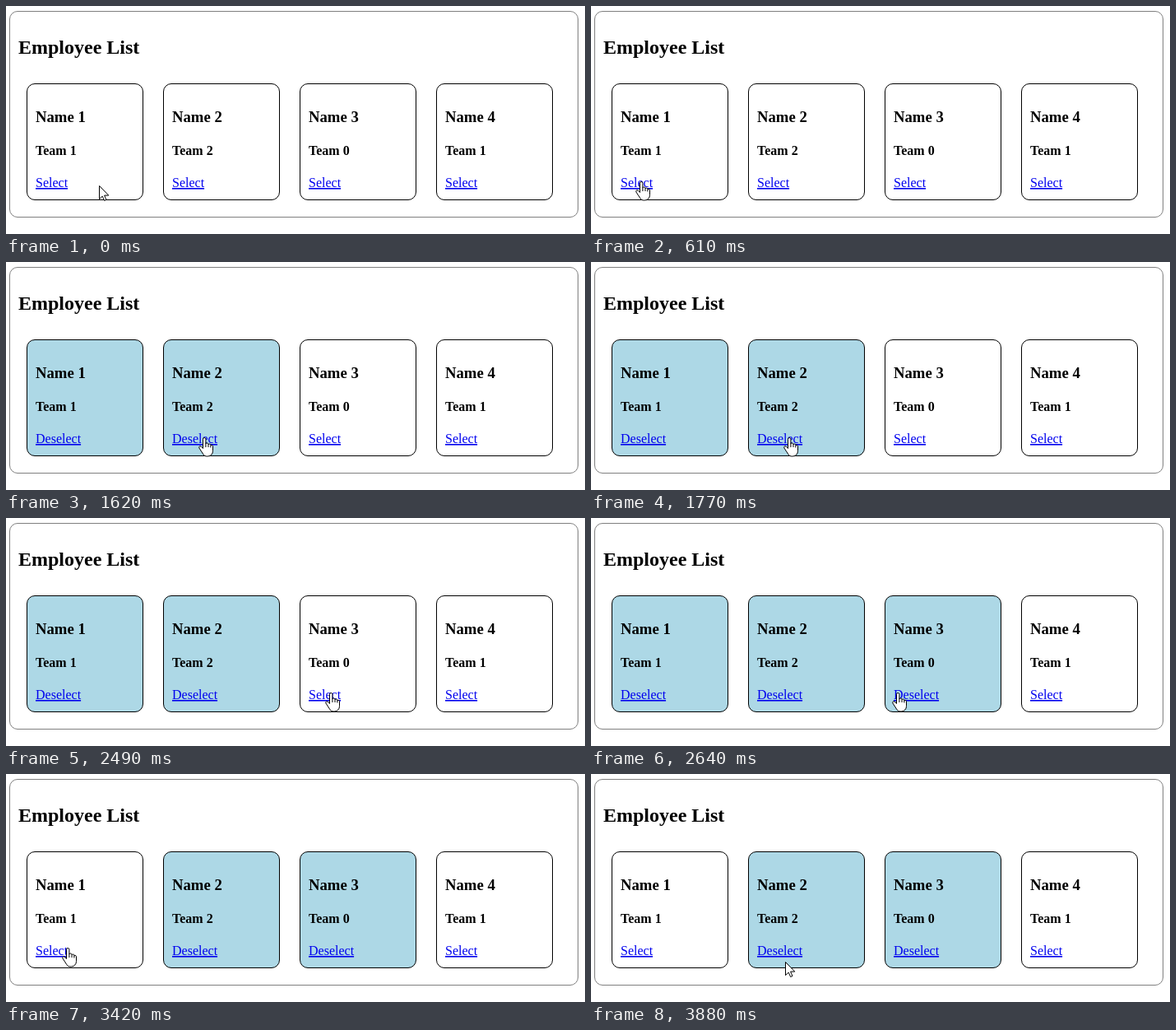
Animation, 704 px wide and 277 px high, one loop 4.19 s. Source, as an HTML page:

```html
<!DOCTYPE html>
<html lang="en">
<head>
<meta charset="utf-8">
<title>Employee List</title>
<style>
  html, body { margin: 0; width: 100%; height: 100%; overflow: hidden; background: #fff; }
  svg { display: block; width: 704px; height: 277px; }
  text { font-family: "Liberation Serif", "Times New Roman", serif; font-size: 16px; }
  .h2 { font-size: 24px; font-weight: bold; }
  .h3 { font-size: 18.72px; font-weight: bold; }
  .h4 { font-weight: bold; }
  .link { fill: #00e; text-decoration: underline 1px; text-underline-offset: 1px; }
  .pointer { fill: #fff; stroke: #000; stroke-linejoin: round; }
</style>
</head>
<body>
<svg id="stage" viewBox="0 0 704 277">
  <rect x="4.5" y="6.5" width="691" height="250" rx="9.5" fill="#fff" stroke="gray"/>
  <text class="h2" x="15" y="58">Employee List</text>
</svg>
<script>
const LOOP = 4190, STEP = 76.5;
const stage = document.getElementById('stage');

function add(tag, attrs, text) {
  const el = document.createElementNS('http://www.w3.org/2000/svg', tag);
  for (const key in attrs) el.setAttribute(key, attrs[key]);
  if (text) el.textContent = text;
  return stage.appendChild(el);
}

function makeCard(i) {
  const left = 25 + 166 * i, x = left + 11;
  const box = add('rect', { x: left + .5, y: 94.5, width: 141, height: 141, rx: 9.5, stroke: '#000' });
  add('text', { class: 'h3', x, y: 141 }, 'Name ' + (i + 1));
  add('text', { class: 'h4', x, y: 181 }, 'Team ' + (i + 1) % 3);
  return { x, box, link: add('text', { class: 'link', x, y: 220 }) };
}

const cards = [0, 1, 2, 3].map(makeCard);
const arrow = add('path', { class: 'pointer',
  d: 'M.5 .5V16.6L4.2 13.1L6.7 18.5L9 17.4L6.6 12.1H11.8Z' });
const hand = add('path', { class: 'pointer',
  d: 'M5.5 14.5V3.3Q5.5 1.5 7.2 1.5T8.9 3.3V9Q9 8 10.4 8T12 9.4V10Q12.2 9 13.4 9' +
     'T14.9 10.4V11.2Q15 10.2 16 10.2T17.5 11.8V17.5Q17.5 20.5 15.8 22Q14.5 24 11.5 24' +
     'H9.5Q7.3 24 6 21.8L.9 14Q.3 12.2 1.8 11.7Q3.4 11.4 5.5 14.5' +
     'M8.9 9V13M12 10V13M14.9 11V13.5' });

// each glide eases the pointer to x, y, where it rests until the next
const home = { x: 113, y: 218 };
const glides = [
  { from: 0, to: 560, x: 60, y: 212 },
  { from: 1010, to: 1570, x: 240, y: 212 },
  { from: 1775, to: 2030, x: 425, y: 202 },
  { from: 2030, to: 2310, x: 376, y: 211 },
  { from: 2480, to: 2490, x: 394, y: 211 },
  { from: 2566, to: 3025, x: 107, y: 207 },
  { from: 3025, to: 3178, x: 70, y: 211 },
  { from: 3331, to: 3484, x: 78, y: 209 },
  { from: 3484, to: 3860, x: 236, y: 228 }
];

// each click toggles one card
const clicks = [
  { at: 1010, card: 0 }, { at: 1622, card: 1 }, { at: 2566, card: 2 }, { at: 3331, card: 0 }
];

function pointerAt(t) {
  let { x, y } = home;
  for (const g of glides) {
    const u = Math.min(1, Math.max(0, (t - g.from) / (g.to - g.from)));
    const k = u * u * (3 - 2 * u);
    x += (g.x - x) * k;
    y += (g.y - y) * k;
  }
  return [Math.round(x), Math.round(y)];
}

// the picture refreshes in even ticks, counted afresh after each long rest
function tick(t) {
  const start = t < 1010 ? 0 : t < 2490 ? 1010 : 2490;
  return start + Math.floor((t - start + 10) / STEP) * STEP;
}

function place(el, x, y, visible) {
  el.setAttribute('transform', `translate(${x} ${y})`);
  el.setAttribute('visibility', visible ? 'visible' : 'hidden');
}

function draw(time) {
  const t = tick(time);
  const [x, y] = pointerAt(t);
  let over = false;
  cards.forEach((card, i) => {
    const selected = clicks.filter(c => c.card === i && c.at <= t).length % 2;
    card.box.setAttribute('fill', selected ? '#add8e6' : '#fff');
    card.link.textContent = selected ? 'Deselect' : 'Select';
    const width = selected ? 55 : 39;
    if (x >= card.x && x <= card.x + width && y >= 206 && y <= 224) over = true;
  });
  place(arrow, x, y, !over);
  place(hand, x - 6, y, over);
}

const began = performance.now();
function loop() {
  draw((performance.now() - began) % LOOP);
  requestAnimationFrame(loop);
}
loop();
</script>
</body>
</html>
```
